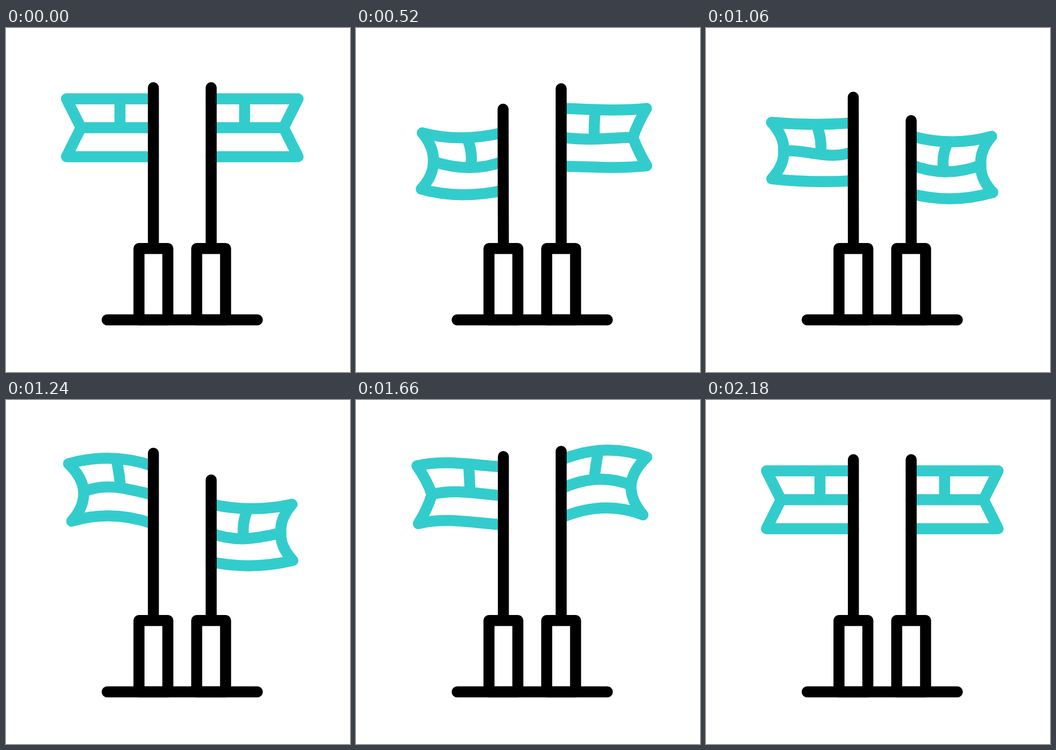
An HTML page with a canvas for the animation above (2400 ms loop, 640x640 px).

```html
<!DOCTYPE html>
<html lang="en">
<head>
<meta charset="utf-8">
<title>Waving flags</title>
<style>
  html, body { margin: 0; width: 100%; height: 100%; overflow: hidden; background: #fff; }
  canvas { display: block; }
</style>
</head>
<body>
<canvas id="stage" width="640" height="640"></canvas>
<script>
const ctx = document.getElementById('stage').getContext('2d');
const LOOP = 2400, START = 180, STEP = 570, DELAY = 280;
const MIRROR = 655.9, POLE_X = 274.2, BASE_Y = 410.3, GROUND_Y = 543;
const TEAL = '#33cccc', BLACK = '#000';

// tip, notch and tail are vertical offsets of the free end; hem, middle, edge and barBend are bends.
const rest = { pole: 111, top: 131.8, tipX: 112.5, tip: 0, notch: 0, tail: 0,
  hem: 0, middle: 0, edge: 0, barX: 212, barBend: 0 };
const sag = { pole: 173, top: 200.8, tipX: 124.4, tip: .8, notch: .5, tail: -2.5,
  hem: 14, middle: 17, edge: 6.5, barX: 205.5, barBend: 5 };
const lift = { pole: 95, top: 110.8, tipX: 115, tip: -5.4, notch: -7, tail: -5.6,
  hem: -21.3, middle: -19.5, edge: 6.5, barX: 204.8, barBend: .5 };

const smooth = s => s * s * (3 - 2 * s);

// Each move has its own cloth easing and S-shaped twist; the poles always ease smoothly.
const MOVES = [
  { from: rest, to: sag, ease: s => 1 - (1 - s) ** 2.6, hemTwist: 11, middleTwist: -14 },
  { from: sag, to: lift, ease: s => smooth(s ** 1.77), hemTwist: 0, middleTwist: -55 },
  { from: lift, to: rest, ease: smooth, hemTwist: -26, middleTwist: -22 }
];

function poseAt(time) {
  const phase = Math.min(Math.max((time - START) / STEP, 0), MOVES.length);
  const index = Math.min(Math.floor(phase), MOVES.length - 1);
  const { from, to, ease, hemTwist, middleTwist } = MOVES[index];
  const s = phase - index, p = ease(s), pose = {};
  for (const key in from) pose[key] = from[key] + (to[key] - from[key]) * p;
  pose.pole = from.pole + (to.pole - from.pole) * smooth(s);
  pose.hemTwist = hemTwist * p * (1 - p);
  pose.middleTwist = middleTwist * p * (1 - p);
  return pose;
}

function stroke(color, build) {
  ctx.strokeStyle = color;
  ctx.beginPath();
  build();
  ctx.stroke();
}

function line(x0, y0, x1, y1) {
  ctx.moveTo(x0, y0);
  ctx.lineTo(x1, y1);
}

// A cloth line from its free end (x, y) to the pole.
function seam(x, y, endY, bend, twist) {
  const dx = POLE_X - x, dy = endY - y, a = bend + twist, b = bend - twist;
  const near = [x + dx / 3, y + dy / 3 + a], far = [x + dx * 2 / 3, y + dy * 2 / 3 + b];
  return {
    outward: () => ctx.bezierCurveTo(...far, ...near, x, y),
    inward: () => ctx.bezierCurveTo(...near, ...far, POLE_X, endY),
    at(px) {
      const u = (px - x) / dx, v = 1 - u;
      return y + dy * u + 3 * u * v * (a * v + b * u);
    }
  };
}

// A curve that bows to the right by the given amount at its middle.
function bow(x0, y0, x1, y1, amount) {
  ctx.quadraticCurveTo((x0 + x1) / 2 + 2 * amount, (y0 + y1) / 2, x1, y1);
}

function drawFlag(pose) {
  const { top, tipX, hem, hemTwist, edge, barX } = pose;
  const middle = top + 53.7, bottom = top + 107.6;
  const tipY = top + pose.tip;
  const notchX = 139.5 + .75 * edge, notchY = middle + pose.notch;
  const tailX = 112.5 + 1.5 * edge, tailY = bottom + pose.tail;
  const upper = seam(tipX, tipY, top, hem, hemTwist);
  const center = seam(notchX, notchY, middle, pose.middle, pose.middleTwist);
  const lower = seam(tailX, tailY, bottom, hem, hemTwist);
  const barEnd = 212 + .15 * edge, barTop = upper.at(barX);

  stroke(TEAL, () => {
    ctx.moveTo(POLE_X, top);
    upper.outward();
    bow(tipX, tipY, notchX, notchY, edge);
    bow(notchX, notchY, tailX, tailY, edge);
    lower.inward();
    ctx.moveTo(notchX, notchY);
    center.inward();
    ctx.moveTo(barX, barTop);
    bow(barX, barTop, barEnd, center.at(barEnd), pose.barBend);
  });
}

function drawSide(time, lean) {
  const pose = poseAt(time);
  drawFlag(pose);
  stroke(BLACK, () => {
    const shift = lean * Math.max(0, (pose.pole - rest.pole) / (sag.pole - rest.pole));
    line(POLE_X - shift, pose.pole, POLE_X, BASE_Y);
    ctx.rect(247.4, BASE_Y, 53.7, GROUND_Y - BASE_Y);
  });
}

function render() {
  const time = performance.now() % LOOP;
  ctx.fillStyle = '#fff';
  ctx.fillRect(0, 0, 640, 640);
  ctx.lineWidth = 20.5;
  ctx.lineCap = ctx.lineJoin = 'round';

  drawSide(time, .9);
  ctx.save();
  ctx.translate(MIRROR, 0);
  ctx.scale(-1, 1);
  drawSide(time - DELAY, 0);
  ctx.restore();
  stroke(BLACK, () => line(188.2, GROUND_Y, 467.6, GROUND_Y));

  requestAnimationFrame(render);
}
render();
</script>
</body>
</html>
```
